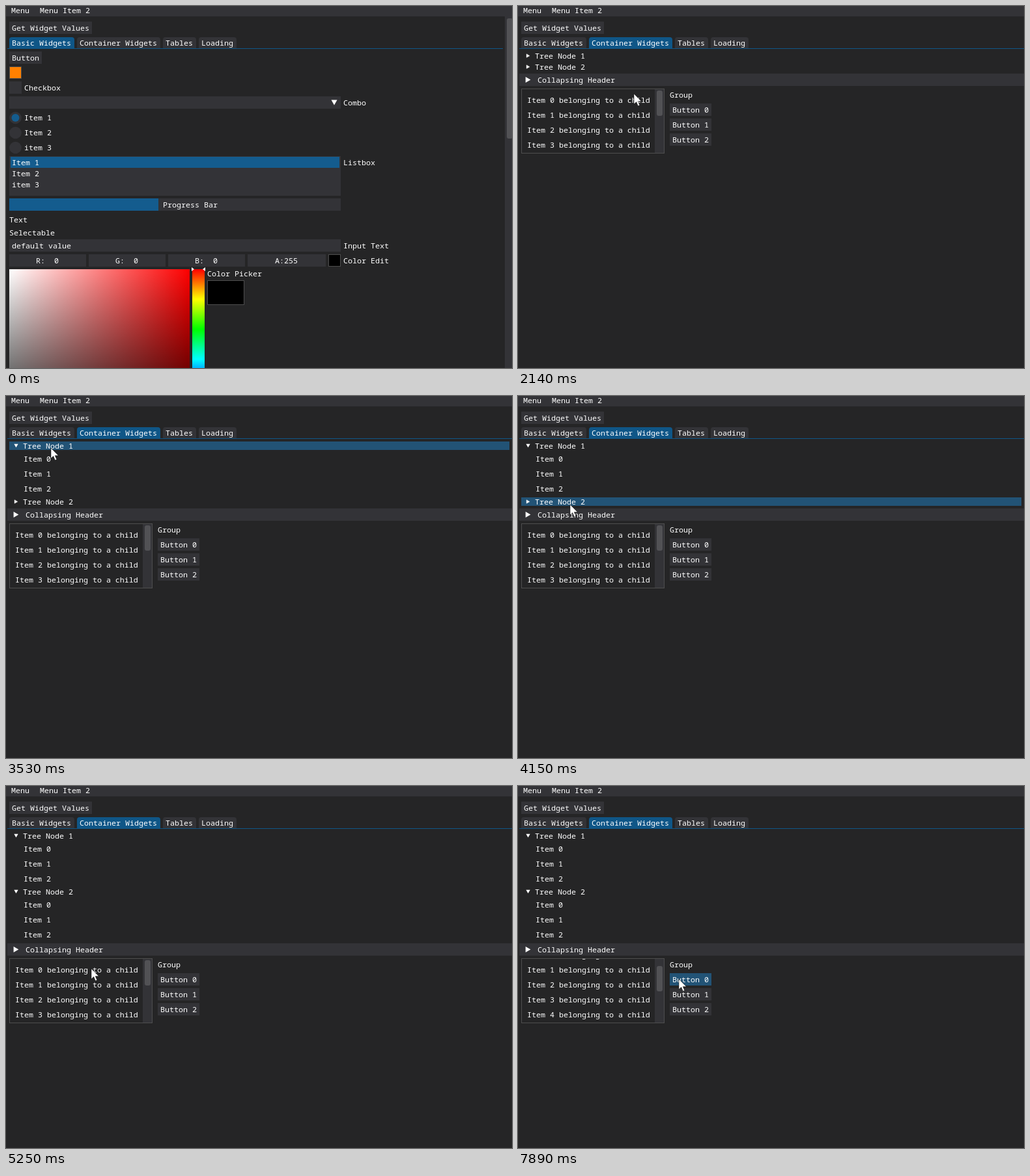
An HTML page for the animation above (8000 ms loop, 777 by 557 pixels).

```html
<!DOCTYPE html>
<html lang="en">
<head>
<meta charset="utf-8">
<title>Widget demo</title>
<style>
  html, body { margin: 0; width: 100%; height: 100%; overflow: hidden; background: #252526; }
  svg { display: block; width: 777px; height: 557px; }
  text { font: 11.667px "Noto Sans Mono", "DejaVu Sans Mono", monospace; fill: #fff; white-space: pre; }
</style>
</head>
<body>
<svg id="stage" viewBox="0 0 777 557"></svg>
<script>
const LOOP = 8000;
const BG = '#252526', FRAME = '#333337', ACTIVE = '#0f5687', SELECT = '#145c8e',
      HOVER = '#225376', BORDER = '#4e4e4e', GRAB = '#525255', GRAB_ACTIVE = '#5a5a5f';

// --- drawing helpers; rows are placed by their middle line ---
const rect = (x, y, w, h, fill = FRAME, more = '') =>
  `<rect x="${x}" y="${y}" width="${w}" height="${h}" fill="${fill}" ${more}/>`;
const text = (x, mid, str) => `<text x="${x}" y="${mid + 4}">${str}</text>`;
const path = (d, more = 'fill="#fff"') => `<path d="${d}" ${more}/>`;
const arrow = (x, mid, size, turn = 0) =>
  path('M-.75-.866L.75 0-.75.866z', `fill="#fff" transform="translate(${x} ${mid - .5}) rotate(${turn}) scale(${size})"`);
const group = (id, ...parts) => `<g id="${id}">${parts.join('')}</g>`;
const rows = (list, x, mid, pitch) => list.map((s, i) => text(x, mid + i * pitch, s)).join('');
const field = (x, mid, w) => rect(x, mid - 10, w, 19);
const button = (x, mid, label, id = '') =>
  rect(x, mid - 10, label.length * 7 + 8, 19, FRAME, id && `id="${id}"`) + text(x + 4, mid, label);
const swatch = (x, y, w, h, fill) =>
  rect(x + .5, y + .5, w - 1, h - 1, fill, `stroke="${BORDER}"`);
const tab = (x, label, id) => {
  const r = x + label.length * 7 + 9;
  return path(`M${x} 65V52q0-4 4-4H${r - 4}q4 0 4 4V65z`, `id="${id}" fill="${FRAME}"`) + text(x + 4, 57, label);
};
const gradient = (id, dir, stops) => `<linearGradient id="${id}" x2="${dir === 'x' ? 1 : 0}" y2="${dir === 'y' ? 1 : 0}">` +
  stops.map(([color, alpha = 1], i) =>
    `<stop offset="${i / (stops.length - 1)}" stop-color="${color}" stop-opacity="${alpha}"/>`).join('') + '</linearGradient>';

const defs = '<defs>' +
  gradient('sat', 'x', [['#fff'], ['#f00']]) +
  gradient('val', 'y', [['#000', 0], ['#000']]) +
  gradient('hue', 'y', ['#f00', '#ff0', '#0f0', '#0ff', '#00f', '#f0f', '#f00'].map(c => [c])) +
  `<clipPath id="childClip">${rect(6, 128, 218, 98)}</clipPath></defs>`;

const frame = rect(0, 0, 777, 557, BG) + rect(0, 0, 777, 16) +
  text(8, 7, 'Menu') + text(52, 7, 'Menu Item 2') +
  button(5, 34, 'Get Widget Values') +
  tab(5, 'Basic Widgets', 'tabBasic') + tab(109, 'Container Widgets', 'tabContainer') +
  tab(241, 'Tables', 'tabTables') + tab(296, 'Loading', 'tabLoading') +
  rect(2, 65, 775, 1, ACTIVE);

const names = ['Item 1', 'Item 2', 'item 3'];
const channels = [['R:  0', 5, 118, 46], ['G:  0', 127, 118, 168], ['B:  0', 249, 118, 290], ['A:255', 371, 120, 413]];
const basic = group('basic',
  button(5, 80, 'Button'),
  swatch(5, 93, 19, 19, '#ff8000'),
  field(5, 126, 19), text(28, 126, 'Checkbox'),
  field(5, 149, 509), arrow(504, 149, 5.2, 90), text(518, 149, 'Combo'),
  names.map((s, i) => `<circle cx="14.5" cy="${172 + 23 * i}" r="9.3" fill="${FRAME}"/>` + text(28, 172 + 23 * i, s)).join(''),
  `<circle cx="14.5" cy="172" r="6" fill="${SELECT}"/>`,
  rect(5, 231, 509, 61), rect(7, 232, 505, 17, SELECT), rows(names, 9, 241, 17), text(518, 241, 'Listbox'),
  field(5, 306, 509), rect(5, 296, 229, 19, SELECT), text(241, 306, 'Progress Bar'),
  text(5, 329, 'Text'), text(5, 349, 'Selectable'),
  field(5, 369, 509), text(9, 369, 'default value'), text(518, 369, 'Input Text'),
  channels.map(([s, x, w, tx]) => field(x, 392, w) + text(tx, 392, s)).join(''),
  swatch(495, 382, 19, 19, '#000'), text(518, 392, 'Color Edit'),
  rect(5, 405, 277, 277, 'url(#sat)'), rect(5, 405, 277, 277, 'url(#val)'),
  rect(286, 405, 19, 277, 'url(#hue)'),
  path('M285 402l4 3-4 3zM306 402l-4 3 4 3z'),
  text(309, 412, 'Color Picker'), swatch(309, 422, 57, 38, '#000'));

const treeNode = (n, mid) =>
  rect(5, mid - 7, 768, 13, HOVER, `id="hot${n}"`) +
  group('shut' + n, arrow(15.5, mid, 3.64)) +
  group('open' + n, arrow(15.5, mid, 3.64, 90), rows(['Item 0', 'Item 1', 'Item 2'], 27, mid + 20, 23)) +
  text(26, mid, 'Tree Node ' + n);

const childItems = [...Array(7).keys()].map(i => `Item ${i} belonging to a child`);
const child = `<g clip-path="url(#childClip)">` +
  group('list', rows(childItems, 14, 145, 23)) +
  group('childBar', rect(210, 128, 14, 98), rect(213, 130, 9, 39, GRAB, 'id="grab" rx="3"')) +
  `</g>` + rect(5.5, 127.5, 219, 99, 'none', `stroke="${BORDER}"`);

const container = group('container',
  treeNode(1, 77),
  group('below1',
    treeNode(2, 94),
    group('below2',
      rect(2, 104, 775, 19, FRAME, 'id="header"'), arrow(15.5, 114, 5.2), text(30, 114, 'Collapsing Header'),
      child,
      text(233, 137, 'Group'),
      button(233, 160, 'Button 0', 'button0'), button(233, 183, 'Button 1'), button(233, 206, 'Button 2'))));

const mainBar = group('mainBar',
  rect(763, 16, 14, 541, BG), rect(766, 16, 11, 541), rect(769, 19, 9, 185, GRAB, 'rx="3"'));

const cursor = group('cursor',
  '<circle id="press" cx="-1" cy="0" r="12" fill="#fff000" fill-opacity=".54"/>',
  path('M0 0V16l3.7-3.4 2.6 6.2 2.6-1.1-2.6-6H11.5z', 'fill="#fff" stroke="#000" stroke-width=".5"'));

document.getElementById('stage').innerHTML = defs + frame + basic + container + mainBar + cursor;

// --- timeline: everything changes in hard steps, times in ms ---
let css = '';
const keys = (id, prop, list) => {
  const body = list.map(([ms, v]) => `${ms / LOOP * 100}%{${prop}:${v}}`).join('');
  css += `@keyframes ${id}{${body}}#${id}{animation:${id} ${LOOP}ms step-end infinite}`;
};
// alternates between off and on at the given times
const toggle = (id, prop, off, on, ...times) =>
  keys(id, prop, [[0, off], ...times.map((ms, i) => [ms, i % 2 ? off : on])]);
const show = (id, ...times) => toggle(id, 'opacity', 0, 1, ...times);
const shift = (x, y) => `translate(${x}px,${y}px)`;

show('basic', 0, 1210);
show('container', 1210);
show('mainBar', 0, 1300);
show('childBar', 1300);
keys('tabBasic', 'fill', [[0, ACTIVE], [1210, FRAME]]);
keys('tabContainer', 'fill', [[0, FRAME], [1010, HOVER], [1610, ACTIVE]]);

[[1, 3430], [2, 4450]].forEach(([n, ms]) => {
  show('shut' + n, 0, ms);
  show('open' + n, ms);
  toggle('below' + n, 'transform', shift(0, 0), shift(0, 69), ms);
});
show('hot1', 1610, 1710, 3130, 3850);
show('hot2', 1710, 1810, 2730, 2930, 4050, 4650);
toggle('header', 'fill', FRAME, HOVER, 1810, 2010, 2630, 2730, 4950, 5250);
toggle('button0', 'fill', FRAME, HOVER, 7570);
show('press', 1110, 1300, 3330, 3530, 4350, 4550, 6470, 7370);

// the pointer advances every 100 ms and slows down towards each stop
let at = [894, 634];
const trail = [[0, shift(...at)]];
const move = (ms, n, x, y) => {
  const [x0, y0] = at;
  for (let i = 1; i <= n; i++) {
    const u = i / n, e = u * (2 - u);
    trail.push([ms + 100 * (i - 1), shift(Math.round(x0 + (x - x0) * e), Math.round(y0 + (y - y0) * e))]);
  }
  at = [x, y];
};
move(200, 8, 184, 57);
move(1010, 1, 180, 52);
move(1610, 8, 178, 141);
move(2430, 1, 160, 146);
move(2530, 6, 69, 85);
move(3130, 2, 69, 80);
move(3850, 4, 80, 167);
move(4650, 6, 128, 256);
move(5250, 1, 131, 281);
move(5350, 1, 134, 294);
move(5670, 7, 213, 294);

// dragging the child scrollbar: the list travels 2.55 px per pixel of the grab
const list = [[0, shift(0, 0)]], grab = [[0, shift(0, 0)]];
[[6470, 0], [6570, 4], [6670, 6], [6770, 7], [6870, 8], [7270, 9]].forEach(([ms, d]) => {
  move(ms, 1, 213, 297 + d);
  grab.push([ms, shift(0, d)]);
  list.push([ms, shift(0, -Math.round(d * 2.55))]);
});
keys('list', 'transform', list);
keys('grab', 'transform', grab);
css += `@keyframes grabTint{0%{fill:${GRAB}}${6470 / 80}%{fill:${GRAB_ACTIVE}}${7370 / 80}%{fill:${GRAB}}}` +
  `#grab{animation:grab ${LOOP}ms step-end infinite,grabTint ${LOOP}ms step-end infinite}`;

move(7370, 6, 247, 297);
keys('cursor', 'transform', trail);

document.head.appendChild(document.createElement('style')).textContent = css;
</script>
</body>
</html>
```
